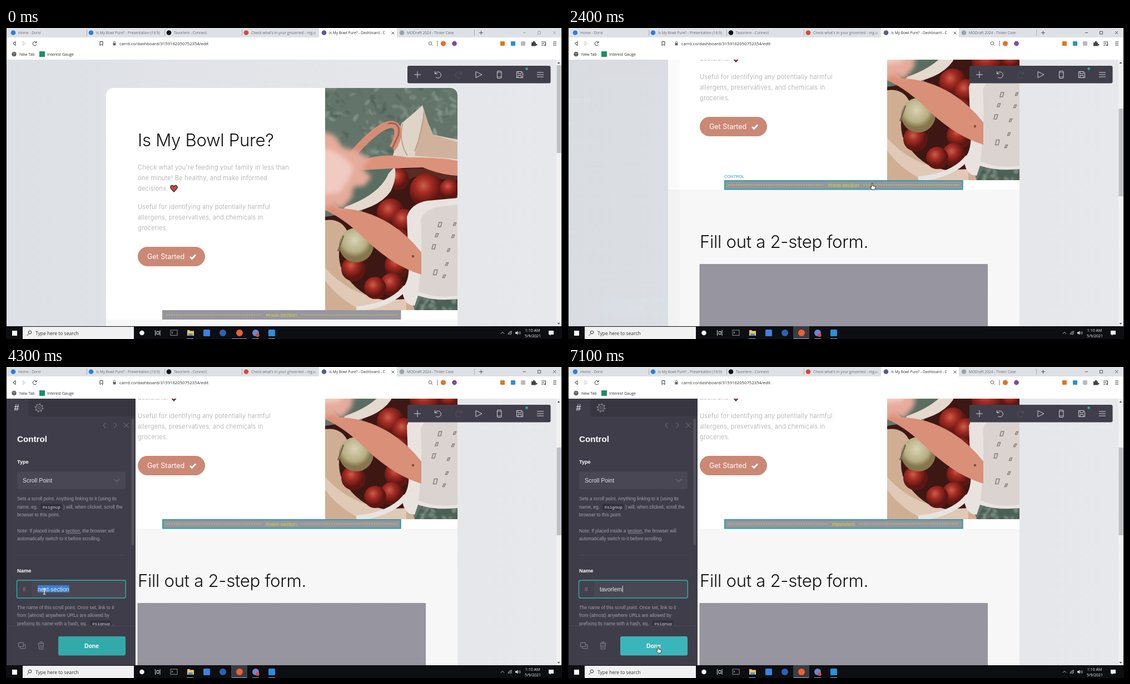
Animation of 1000 by 560 pixels, one loop 7.2 s. Source, as an HTML page:

```html
<!DOCTYPE html>
<html lang="en">
<head>
<meta charset="utf-8">
<style>
html, body { margin: 0; width: 100%; height: 100%; overflow: hidden; background: #000 }
svg { display: block; width: 1000px; height: 560px }
text { white-space: pre }
.ui { font-family: "Open Sans", sans-serif; fill: #333 }
.page { font-family: Inter, sans-serif; font-weight: 300 }
.side { font-family: "Liberation Sans", Arial, sans-serif }
.mono { font-family: "Liberation Mono", monospace }
</style>
</head>
<body>
<script>
const LOOP = 7200, WORD = 'tavorlem', OLD = 'next-section', TITLE = 'Is My Bowl Pure?';

const text = (x, y, size, s, attrs = '') => `<text x="${x}" y="${y}" font-size="${size}" ${attrs}>${s}</text>`;
const rect = (x, y, w, h, fill, attrs = '') => `<rect x="${x}" y="${y}" width="${w}" height="${h}" fill="${fill}" ${attrs}/>`;
const dot = (x, y, r, fill, attrs = '') => `<circle cx="${x}" cy="${y}" r="${r}" fill="${fill}" ${attrs}/>`;
const path = (d, fill, attrs = '') => `<path d="${d}" fill="${fill}" ${attrs}/>`;
const line = (d, color, width = 1, attrs = '') => path(d, 'none', `stroke="${color}" stroke-width="${width}" ${attrs}`);

let seed = 7;
const rnd = () => (seed = seed * 16807 % 2147483647) / 2147483647;

function leaves(n, y, h) {
  const colors = ['#8d9c91', '#45564c', '#76877c', '#566a5f', '#a2ada3'];
  let s = '';
  for (let i = 0; i < n; i++) {
    const cx = 574 + rnd() * 238, cy = y + rnd() * h;
    s += `<ellipse cx="${cx}" cy="${cy}" rx="${3 + rnd() * 7}" ry="${1.5 + rnd() * 3}" fill="${colors[i % 5]}"
      opacity=".45" transform="rotate(${rnd() * 180} ${cx} ${cy})"/>`;
  }
  return `<g filter="url(#blur)">${s}</g>`;
}

function photo() {
  const apples = [[705, 272, 20], [757, 293, 31], [798, 290, 18], [692, 332, 25], [716, 348, 22], [706, 385, 24],
    [704, 428, 23], [694, 462, 21]];
  const marks = [[781, 354, 8], [775, 373, 6], [770, 394, 8], [773, 440, 9], [807, 353, 5], [804, 375, 5],
    [796, 400, 5], [793, 425, 5], [788, 447, 5]];
  return `<g clip-path="url(#photoClip)">
  ${rect(574, 108, 238, 400, '#63756a')}
  ${leaves(320, 108, 210)}
  ${path('M574 340V508H730L812 300V235L690 240 640 330Z', '#3d1713')}
  ${path('M692 245L711 172Q735 152 749 139L758 168 768 192 812 201V262L740 245Z', '#e0d4c8')}
  ${path('M752 150L758 168 768 192 812 205V236L735 230Z', '#d0b29c')}
  ${line('M713 172Q706 205 722 230M752 148Q750 185 735 222', '#b9a190', 2)}
  ${path('M812 255Q760 250 700 255L690 290 735 268 812 275Z', '#5c2a22')}
  ${apples.map(([x, y, r]) => dot(x, y, r, 'url(#apple)')).join('')}
  ${path('M590 330Q660 322 684 292Q700 270 697 240L650 250Z', '#5a6d61')}
  ${path('M600 335Q668 328 692 294Q704 268 699 250L688 262Q672 300 610 322Z', '#e4d9cf')}
  ${path('M574 346Q602 342 614 366Q592 395 602 430Q624 474 668 490L730 492 735 508H574Z', '#cfae94')}
  ${path('M574 432Q615 478 680 490L720 488V508H640Q600 490 574 455Z', '#e0c9b6')}
  ${dot(625, 434, 22, 'url(#apple)')}${dot(664, 468, 20, 'url(#apple)')}${dot(630, 391, 31, 'url(#green)')}
  ${line('M597 402L607 374', '#7c614e', 2.5)}
  ${path('M735 508L750 480H812V508Z', '#4c6056')}
  <g clip-path="url(#grass)">${leaves(140, 478, 30)}</g>
  ${path('M721 340Q728 316 758 311L812 306V488Q770 492 741 482L735 500Q715 500 712 470Q727 455 724 420Z', '#e9e3e0')}
  ${path('M746 345Q752 326 780 322L812 318V482Q770 488 742 474Q750 400 746 345Z', '#dbd3cf')}
  ${line('M630 506Q690 500 716 470Q722 460 725 488', '#e9e3e0', 9)}
  ${marks.map(([x, y, r]) => line(`M${x - r / 2} ${y + r / 2}l2 ${-r}h${r * .6}l-2 ${r}Z`, '#8d8177', 1.6)).join('')}
  ${line('M610 245Q645 198 678 178Q704 166 705 188Q704 204 695 216', '#d68d77', 13)}
  ${line('M687 172Q710 168 706 192L695 216', '#a3604f', 3)}
  ${path('M625 245Q670 222 722 233Q770 232 812 239V266Q780 264 750 251Q700 252 640 256Z', '#dc917b')}
  ${path('M574 300L600 325Q645 325 690 352Q722 372 747 404V444Q700 430 652 386Q612 345 574 328Z', '#d98f78')}
  ${dot(732, 411, 2.3, '#75523f')}
  <g filter="url(#soft)">
    ${path('M565 185L590 193 606 215 632 222 655 236 640 252 657 268 645 284 625 286 622 305 604 326 585 318 565 328Z', '#e5ab9b')}
    ${path('M565 215L590 222 612 236 625 252 615 275 600 296 565 300Z', '#f0cbc1')}
  </g></g>`;
}

const defs = `<defs>
  <linearGradient id="bg"><stop stop-color="#dde0e5"/><stop offset=".5" stop-color="#e3e5e9"/><stop offset="1" stop-color="#e7e8ec"/></linearGradient>
  <radialGradient id="apple" cx=".4" cy=".35"><stop stop-color="#c9604a"/><stop offset=".45" stop-color="#a52c24"/><stop offset="1" stop-color="#5e1612"/></radialGradient>
  <radialGradient id="green" cx=".45" cy=".35"><stop stop-color="#d9d3b4"/><stop offset=".7" stop-color="#b7ae84"/><stop offset="1" stop-color="#86764d"/></radialGradient>
  <filter id="soft"><feGaussianBlur stdDeviation="4"/></filter>
  <filter id="blur"><feGaussianBlur stdDeviation="1"/></filter>
  <clipPath id="photoClip"><path d="M574 108H799A13 13 0 0 1 812 121V508H574Z"/></clipPath>
  <clipPath id="grass"><path d="M735 508L750 480H812V508Z"/></clipPath>
  <clipPath id="view"><rect x="1" y="57" width="998" height="480"/></clipPath>
</defs>`;

function page() {
  const heading = (y, s) => text(237, y, 31.2, s, 'fill="#111" letter-spacing="-.3"');
  const copy = [[255, "Check what you're feeding your family in less than"], [274, 'one minute! Be healthy, and make informed'],
    [293, 'decisions.'], [325.5, 'Useful for identifying any potentially harmful'], [344.5, 'allergens, preservatives, and chemicals in'], [363.5, 'groceries.']];
  return `<g id="page" class="page">
  ${path('M180 530V121A13 13 0 0 1 193 108H799A13 13 0 0 1 812 121V530Z', '#fff')}
  ${rect(180, 525, 632, 500, '#f7f7f8')}
  ${photo()}
  ${heading(213, TITLE)}
  <g fill="#a5a5a7" letter-spacing=".28">${copy.map(([y, s]) => text(237, y, 11, s)).join('')}</g>
  ${path('M302 295L296.5 289Q294.5 285 298 283.5Q300.5 283 302 285.5Q303.5 283 306 283.5Q309.5 285 307.5 289Z', '#d9433f', 'stroke="#33282b" stroke-width="1.3"')}
  ${rect(237, 394, 121, 35, '#cb8875', 'rx="17.5"')}
  ${text(254, 416.3, 12.5, 'Get Started', 'fill="#fff" font-weight="400"')}
  ${line('M331 412L334.5 415.5 341 408.5', '#fff', 2.8)}
  ${rect(281, 508, 429.5, 17, '#97959f')}
  <path id="dashes" stroke="#d3cf4b" stroke-width="1" stroke-dasharray="3 1.5"/>
  ${text(495.5, 519.5, 9.5, '', 'id="label" class="side" text-anchor="middle" font-weight="400" fill="#d8d53a"')}
  ${rect(282, 509, 427.5, 15.5, 'none', 'id="outline" stroke="#2ba0a6" stroke-width="2"')}
  ${text(281, 504, 7.4, 'CONTROL', 'id="tag" class="side" font-weight="400" fill="#2f93a8"')}
  ${heading(630, 'Fill out a 2-step form.')}
  ${rect(237, 659.5, 517.5, 300, '#97959f', 'stroke="#77757f" stroke-dasharray="2 1"')}
  </g>`;
}

function browser() {
  const tabs = [[22, 'Home - Dorvi', '#2f7fd6'], [162, TITLE + ' - Presentation (16:9)', '#2f7fd6'], [302, 'Tavorlem - Connect', '#111'],
    [441, "Check what's in your groceries! - mg.u", '#d5483c'], [581, TITLE + ' - Dashboard - C', '#565a94'], [721, 'MODraft 2024 - Tinker Case', '#9aa3a5']];
  const plugs = [[893, '#e2761b'], [912, '#2a8fd0'], [930, '#b9b9b9']];
  return `<g class="ui">
  ${rect(1, 0, 998, 17, '#dde1e6')}${rect(1, 17, 998, 40, '#fff')}${rect(563, 0, 140, 17, '#fff')}
  ${line('M145.5 3V14M285.5 3V14M424.5 3V14M842.5 3V14', '#a9adb4')}
  ${tabs.map(([x, s, c], i) => dot(x - 9, 8.5, 4.3, c) + text(x, 11, 6.6, s, `fill="${i == 4 ? '#333' : '#6a6e75'}"`)).join('')}
  ${line('M693.5 6.5l5 5m0 -5l-5 5M851 8.5h7m-3.5 -3.5v7', '#555')}
  ${line('M930 8.5h5M956.5 6h5v5h-5ZM984 6l5 5m0 -5l-5 5', '#444', .9, 'id="controls"')}
  ${line('M17 24.5L12.5 28 17 31.5ZM169 24.5h5v7l-2.5 -2 -2.5 2Z', '#333')}
  ${line('M30.5 24.5L35 28 30.5 31.5Z', '#c4c4c4')}
  ${line('M54.5 26A3.5 3.5 0 1 0 55 29.5M55 24v2.7h-2.7', '#333')}
  ${rect(192.5, 27, 5, 4.3, '#666')}${line('M193.5 27v-1.5a1.5 1.5 0 0 1 3 0V27', '#666', .9)}
  ${text(204, 31, 7.7, 'carrd.co/dashboard/3159162050752354/edit')}
  ${dot(763, 27.5, 2.8, 'none', 'stroke="#666"')}${line('M765 29.5l2.5 2.5M776 23v10', '#777')}
  ${dot(786.5, 28, 4.6, '#ee6a2c')}${dot(806.5, 28, 4.4, '#7b4fa0')}
  ${plugs.map(([x, c]) => rect(x - 4, 24, 8, 8, c, 'rx="1"')).join('')}
  ${path('M945 26h3a1.7 1.7 0 1 1 3 0h2v3a1.5 1.5 0 1 1 0 2v1.5h-8Z', '#444')}
  ${line('M963 25h8M963 28h5M963 31h4M970.5 25v5.5M984 25h6M984 28h6M984 31h6', '#444', 1.2)}
  ${dot(969.5, 31, 1.3, '#444')}
  ${dot(14.5, 47, 4.2, '#555')}${line('M10.5 46h8M14.5 43v8', '#bbb', .7)}
  ${text(24, 49.6, 7, 'New Tab')}
  ${rect(60, 42, 10, 10, '#1c8f63')}${text(74, 49.6, 7, 'Interest Gauge')}
  </g>`;
}

function toolbar() {
  return `${rect(722, 68, 257.5, 31.5, '#403e4a', 'rx="3"')}
  ${line('M734 84h12M740 78v12M771.5 78v4.5h4.5M772 82A5.5 5.5 0 1 1 773 88.5M845 78.5V89.5L856 84Z', '#d3d2d8')}
  ${line('M819.5 78v4.5h-4.5M819 82A5.5 5.5 0 1 0 818 88.5', '#56545f')}
  ${rect(883.5, 77.5, 7.5, 13, 'none', 'rx="1.5" stroke="#d3d2d8"')}${line('M884 80h7M884 88h7', '#d3d2d8', .8)}
  ${line('M918.5 78.5h9l2 2v9h-11ZM921 78.5v4h6v-4M921 89.5v-4h6v4', '#d3d2d8')}
  ${dot(936.5, 73.5, 2.4, '#2fa79a')}
  ${line('M955 80h12M955 84h12M955 88h12', '#d3d2d8')}`;
}

function panel() {
  const help = (y, s) => text(20, y, 8.3, s);
  const bold = (x, y, size, s) => text(x, y, size, s, 'fill="#fff" font-weight="700"');
  const code = (x, y) => rect(x, y - 8.5, 38, 11, '#33313c', 'rx="2"') + text(x + 3.5, y - .5, 7.7, '#signup', 'class="mono" fill="#dddce2"');
  return `<g id="panel" class="side">
  ${rect(1, 57, 232, 480, '#3f3d49')}${rect(40, 57, 193, 32, '#383641')}
  ${text(14.5, 79, 16, '#', 'fill="#fff"')}
  ${dot(59.5, 73.5, 5.5, 'none', 'stroke="#85838e" stroke-width="1.2"')}${dot(59.5, 73.5, 2.2, 'none', 'stroke="#85838e"')}
  ${dot(59.5, 73.5, 7, 'none', 'stroke="#85838e" stroke-width="2" stroke-dasharray="2.5 3"')}
  ${line('M179.5 100l-4.5 5 4.5 5M194.5 100l4.5 5 -4.5 5M212 100.5l9 9m0 -9l-9 9', '#7b7984')}
  ${rect(225.5, 93, 4.5, 228, '#55535e', 'rx="2"')}
  ${bold(20, 134.5, 15.2, 'Control')}${bold(20, 174, 9.1, 'Type')}${bold(20, 369.5, 9.3, 'Name')}
  ${rect(20, 188.5, 195, 31.5, '#494753', 'rx="3"')}
  ${text(30, 207.5, 10.5, 'Scroll Point', 'fill="#e3e2e7"')}${line('M194 202l5 4.5 5 -4.5', '#85838e')}
  <g fill="#a19fa9">
  ${help(239.5, 'Sets a scroll point. Anything linking to it (using its')}${help(254.5, 'name, eg.')}
  ${text(103, 254.5, 8.3, ') will, when clicked, scroll the')}${help(268.5, 'browser to this point.')}
  ${help(297.5, 'Note: If placed inside a section, the browser will')}${help(312, 'automatically switch to it before scrolling.')}
  ${help(435.5, 'The name of this scroll point. Once set, link to it')}${help(450, 'from (almost) anywhere URLs are allowed by')}
  ${help(464.5, 'prefixing its name with a hash, eg.')}${text(192, 464.5, 8.3, '.')}
  </g>${code(62, 255)}${code(151.5, 465)}
  ${line('M108 299.5h26', '#a19fa9', .7)}
  ${line('M20 338.5h195', '#4a4853')}
  ${rect(20, 384.5, 195, 31, '#494753', 'rx="3"')}${rect(20, 384.5, 27, 31, '#43414d', 'rx="3"')}
  ${text(30, 403.5, 10.5, '#', 'fill="#85838e"')}
  ${rect(57, 393, 0, 13, '#3a7fd0', 'id="select"')}
  ${text(57, 403.5, 10.5, '', 'id="field" fill="#e9e8ec"')}
  ${rect(0, 394, .9, 11.5, '#fff', 'id="caret"')}
  ${rect(19.5, 384, 195.8, 32, 'none', 'id="focus" rx="3" stroke="#32b0b0" stroke-width="1.4"')}
  ${rect(1, 467, 232, 70, '#3f3d49')}${line('M1 466.5h232', '#4a4853')}
  ${line('M22.5 496.5h9v7h-9ZM25.5 503.5v3.5h9.5v-7h-3.5', '#85838e')}
  ${line('M57.5 497.5h11M61 497v-2h4v2M58.5 498l.8 10h7.4l.8 -10M61.5 500v6M64.5 500v6', '#85838e')}
  ${rect(94, 485, 121, 34.5, '#32aaaa', 'id="done" rx="3"')}${bold(141, 505.5, 10.4, 'Done')}
  </g>`;
}

function taskbar() {
  const apps = [[361, '#3b82e0'], [478, '#2b8fdc']], round = [[390, '#2b62b8'], [420, '#ee6030'], [449, '#7183d2']];
  return `<g class="ui">${rect(0, 537, 1000, 23, '#0d0e12')}
  ${rect(30, 538, 200, 22, '#f1f1f2')}${rect(405, 537, 29, 23, '#3a3c42', 'id="active"')}
  ${rect(11, 545, 9, 9, '#fff')}
  ${dot(43, 548, 2.8, 'none', 'stroke="#333"')}${line('M41 550.5l-3.5 3.5', '#333')}
  ${text(53, 552.5, 8.5, 'Type here to search')}
  ${dot(244.5, 549, 4.3, '#f3f3f3')}
  ${line('M268.5 544v10M271 546.5h4v5h-4ZM277 544v10', '#ddd')}
  ${rect(296, 544, 12, 9.5, '#111', 'stroke="#aaa" stroke-width=".8"')}${line('M298 547l2 1.5 -2 1.5', '#eee', .8)}
  ${path('M326 544h4l1.5 1.5h6.5v8.5h-12Z', '#f2c84f')}${rect(328, 550, 8, 4, '#4a94d4')}
  ${apps.map(([x, c]) => rect(x - 6, 543, 12, 12, c, 'rx="1.5"')).join('')}
  ${round.map(([x, c]) => dot(x, 549, 6, c)).join('')}
  ${dot(452.5, 553, 3.2, '#d94a43')}
  ${line('M325 559.5h12M406 559.5h27M443 559.5h12M472 559.5h12', '#76b0e4')}
  ${line('M890 550.5l3 -3 3 3M903 552a7 7 0 0 1 7 -6M905 552a5 5 0 0 1 5 -4M907 552.5a3 3 0 0 1 3 -2.5', '#ddd', .9)}
  ${path('M916 547.5h2l2.5 -2v7l-2.5 -2h-2Z', '#ddd')}${line('M922 547q1.5 2 0 4M924 546q2.5 3 0 6', '#ddd', .8)}
  <g fill="#f2f2f2" text-anchor="middle">${text(947, 547, 7, '1:10 AM')}${text(947.5, 557, 7, '5/9/2021')}</g>
  ${path('M976 545h9v7h-5l-2 2v-2h-2Z', '#eee')}</g>`;
}

const cursors = `
  <g id="hand">${path('M-1 1Q0 -.5 1 1V5L5 6Q6.5 6.5 6 8.5L5 12H0L-3.5 7.5Q-3.5 6 -1 7.5Z', '#fff', 'stroke="#222" stroke-width=".9"')}</g>
  <g id="arrow">${path('M0 0V9.5L2.2 7.6 3.7 11 5.2 10.3 3.7 7H6.6Z', '#fff', 'stroke="#222" stroke-width=".7"')}</g>
  <g id="beam">${line('M-2.5 -5H2.5M0 -5V5M-2.5 5H2.5', '#fff', 1.2)}</g>`;

document.body.innerHTML = `<svg viewBox="0 0 1000 560">${defs}
  <g clip-path="url(#view)">${rect(1, 57, 998, 480, 'url(#bg)')}${page()}${panel()}
  ${rect(990, 57, 9, 480, '#f1f1f2')}${rect(990.5, 67, 8, 158, '#bfc0c3', 'id="thumb"')}
  ${path('M991.5 64l2.5 -3 2.5 3ZM991.5 531l2.5 3 2.5 -3Z', '#555')}
  ${toolbar()}</g>
  ${browser()}${taskbar()}${cursors}</svg>`;

const $ = id => document.getElementById(id);
const set = (id, attrs) => { for (const k in attrs) $(id).setAttribute(k, attrs[k]); };
const show = (id, on) => set(id, { visibility: on ? 'visible' : 'hidden' });
const smooth = p => p * p * (3 - 2 * p);

// keys: [time, ...values]
function track(keys, t, ease = p => p) {
  if (t <= keys[0][0]) return keys[0].slice(1);
  for (let i = 1; i < keys.length; i++) {
    const [a, b] = [keys[i - 1], keys[i]];
    if (t < b[0]) {
      const p = ease((t - a[0]) / (b[0] - a[0]));
      return a.slice(1).map((v, k) => v + (b[k + 1] - v) * p);
    }
  }
  return keys[keys.length - 1].slice(1);
}

const scrollKeys = [[400, 0], [1100, 105], [1500, 164.5], [1970, 234]];
const panelKeys = [[2370, 0], [2750, 1]];
const mouseKeys = [[1900, 860, 289], [2300, 547, 279], [2700, 547, 279], [3200, 153, 419], [3500, 153, 419],
  [3900, 69, 404], [6400, 69, 404], [6900, 162, 503]];

function draw(t) {
  const [scroll] = track(scrollKeys, t);
  set('page', { transform: `translate(0 ${-scroll})` });
  set('thumb', { y: 67 + scroll / 3 });

  const typed = t < 4900 ? OLD : WORD.slice(0, Math.floor((t - 4900) / 200) + 1);
  $('label').textContent = '#' + typed;
  $('field').textContent = typed;
  const half = $('label').getComputedTextLength() / 2 + 7;
  set('dashes', { d: `M288 516.5H${495.5 - half}M${495.5 + half} 516.5H703.5` });
  show('outline', t >= 2200);
  show('tag', t >= 2200 && t < 2800);

  // the first click brings the window to the front
  const front = t >= 2300;
  show('active', front);
  set('controls', { opacity: front ? 1 : .45 });

  const [p] = track(panelKeys, t, smooth);
  set('panel', { opacity: p, transform: `translate(${-33 * (1 - p)} 0)` });
  const focused = t >= 3900, selected = t >= 4200 && t < 4900, width = $('field').getComputedTextLength();
  show('focus', focused);
  show('caret', focused && !selected);
  set('caret', { x: 57.5 + width });
  set('select', { width: selected ? width : 0 });

  const [x, y] = track(mouseKeys, t, smooth);
  const onDone = x > 94 && y > 485;
  const kind = t < 400 ? '' : x > 233 || onDone ? 'hand' : x > 48 && y > 384 && y < 416 ? 'beam' : 'arrow';
  for (const id of ['hand', 'arrow', 'beam']) {
    show(id, id == kind);
    set(id, { transform: `translate(${x} ${y})` });
  }
  set('done', { fill: onDone ? '#3ab5ba' : '#32aaaa' });
}

const start = performance.now();
function tick() {
  const t = (performance.now() - start) % LOOP;
  draw(Math.floor(t / 100) * 100);
  requestAnimationFrame(tick);
}
tick();
</script>
</body>
</html>
```
